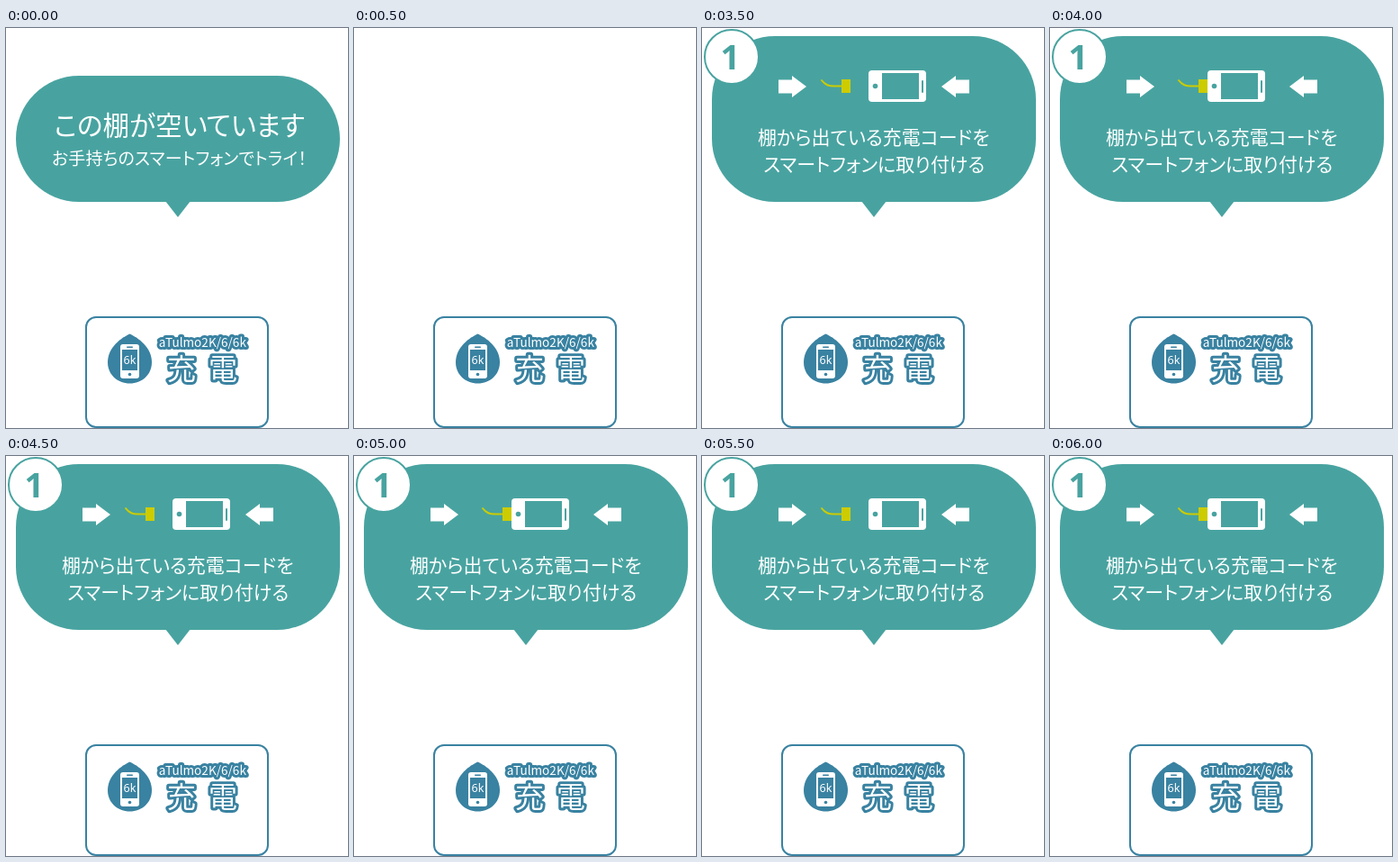
An HTML page that plays this animation: 380x444 px, repeating every 8000 ms.

```html
<!DOCTYPE html>
<html lang="ja">
<head>
<meta charset="utf-8">
<title>充電ガイド</title>
<style>
  html, body { margin: 0; width: 100%; height: 100%; overflow: hidden; background: #fff; }
  svg { display: block; width: 380px; height: 444px; }
  text {
    font-family: "Noto Sans CJK JP", "Noto Sans CJK", sans-serif;
    font-feature-settings: "palt";
    text-anchor: middle;
    fill: #fff;
  }
  .latin { font-family: "Noto Sans", sans-serif; }
  .teal { fill: #48a3a0; }
  .blue { fill: #3982a1; }
  .white { fill: #fff; }
  .guide { font-size: 21px; letter-spacing: .05px; }
  .outlined { stroke: #3982a1; stroke-width: 6; stroke-linejoin: round; paint-order: stroke; font-weight: 500; }
</style>
</head>
<body>
<svg viewBox="0 0 380 444">
  <defs>
    <path id="tail" d="M177 192H205L191 210Z"/>
    <path id="arrow" d="M85 57.5H100V53L116 65L100 77V72.5H85Z"/>
  </defs>

  <g id="intro">
    <rect class="teal" x="11" y="53" width="360" height="140" rx="70"/>
    <use href="#tail" class="teal"/>
    <text x="192.7" y="119" font-size="29.6">この棚が空いています</text>
    <text x="192.5" y="152" font-size="19" letter-spacing=".15">お手持ちのスマートフォンでトライ！</text>
  </g>

  <g id="step">
    <rect class="teal" x="11" y="9" width="360" height="184" rx="70"/>
    <use href="#tail" class="teal"/>
    <circle cx="33" cy="32" r="30" fill="#fff" stroke="#48a3a0" stroke-width="2"/>
    <text class="latin" x="31.3" y="46" font-size="38" font-weight="600" style="fill:#48a3a0">1</text>
    <use href="#arrow" class="white"/>
    <use href="#arrow" class="white" transform="translate(382) scale(-1 1)"/>
    <g id="cable">
      <path d="M132.5 57.5C137 63.5 141 64.5 147 64.5H156" fill="none" stroke="#cc0" stroke-width="2"/>
      <rect x="155" y="57" width="10" height="15" fill="#cc0"/>
    </g>
    <g id="phone">
      <rect class="white" x="185" y="47" width="64" height="35" rx="4"/>
      <rect class="teal" x="200" y="50" width="41" height="29"/>
      <circle class="teal" cx="192.5" cy="64.5" r="2.8"/>
      <rect class="teal" x="244" y="58" width="2" height="14" rx="1"/>
    </g>
    <text class="guide" x="190.8" y="129">棚から出ている充電コードを</text>
    <text class="guide" x="191.3" y="159.3">スマートフォンに取り付ける</text>
  </g>

  <g id="card">
    <rect x="89" y="321" width="202" height="122" rx="11" fill="#fff" stroke="#3982a1" stroke-width="2"/>
    <path class="blue" d="M137.5 339.5C151 346 162 357 162 371C162 385 151 394.5 137.5 394.5S113 385 113 371C113 357 124 346 137.5 339.5Z"/>
    <rect class="white" x="127" y="351" width="21" height="38" rx="3"/>
    <rect class="blue" x="129" y="357" width="17" height="23"/>
    <rect class="blue" x="134" y="353.5" width="7" height="1.5" rx=".7"/>
    <circle class="blue" cx="137.5" cy="384.5" r="1.8"/>
    <text class="latin" x="137.5" y="373" font-size="12.5">6k</text>
    <text class="outlined" x="218.3" y="353.5" font-size="13.6">aTulmo2K/6/6k</text>
    <text class="outlined" x="195 241" y="389.5" font-size="32">充電</text>
  </g>
</svg>
<script>
  const LOOP = 8000, INTRO_END = 500, STEP_START = 3500, BEAT = 500, PLUGGED = 6000;
  const [intro, step, cable, phone] =
    ["intro", "step", "cable", "phone"].map(id => document.getElementById(id));
  const show = (el, on) => el.setAttribute("visibility", on ? "visible" : "hidden");
  const shift = (el, dx) => el.setAttribute("transform", `translate(${dx} 0)`);

  function draw(t) {
    show(intro, t < INTRO_END);
    show(step, t >= STEP_START);
    const beat = Math.floor((t - STEP_START) / BEAT);
    const joined = t >= PLUGGED || Math.abs(beat % 2) === 1;
    shift(cable, joined ? 10 : 0);
    shift(phone, joined ? -10 : 0);
  }

  const start = performance.now();
  function tick() {
    draw((performance.now() - start) % LOOP);
    requestAnimationFrame(tick);
  }
  tick();
</script>
</body>
</html>
```
